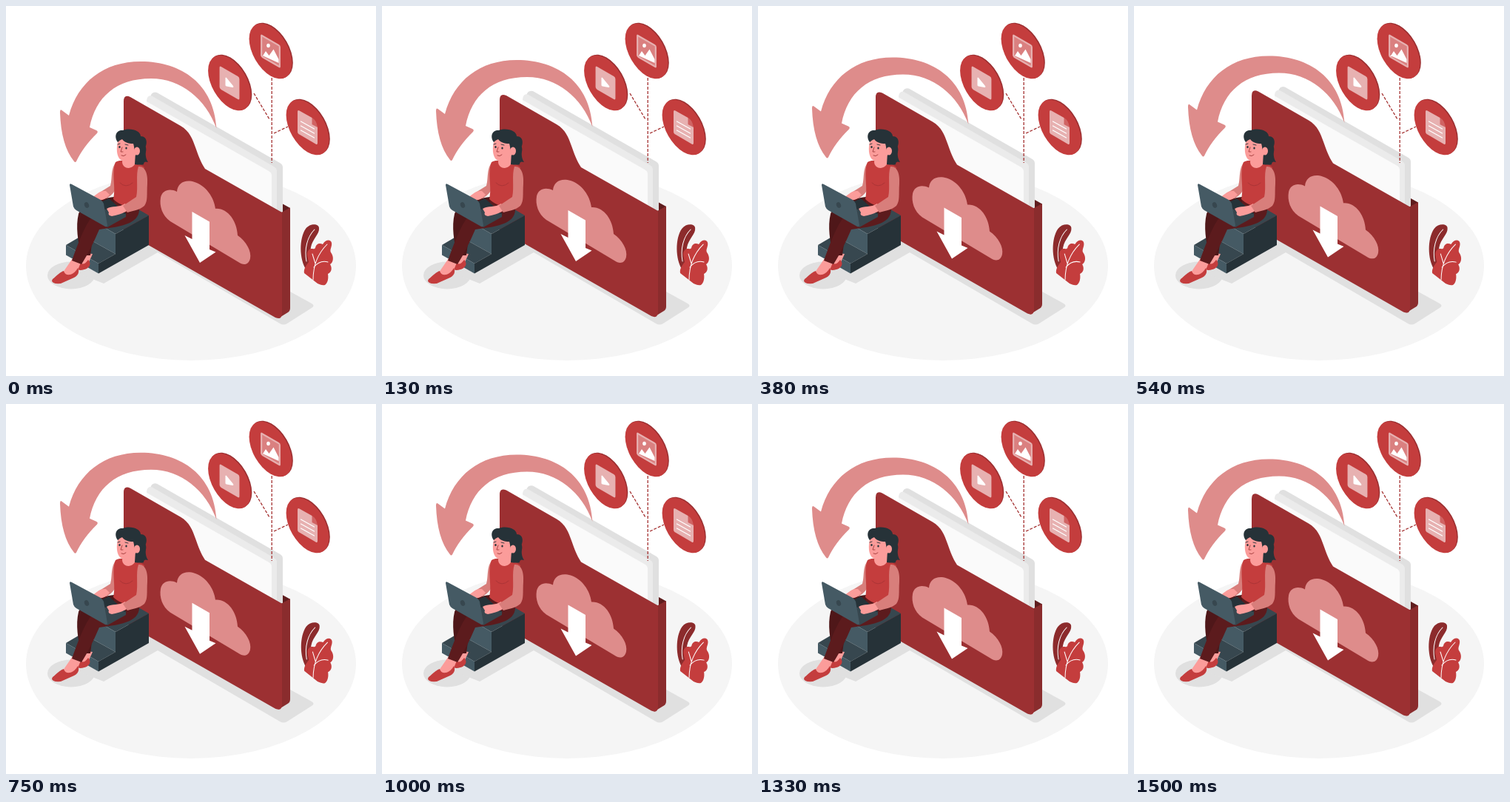
An HTML page for the animation above (1540 ms loop, 500 px wide and 500 px high).

```html
<!DOCTYPE html>
<html lang="en">
<head>
<meta charset="utf-8">
<title>Folder download</title>
<style>
  html, body { margin: 0; width: 100%; height: 100%; overflow: hidden; background: #fff; }
  svg { display: block; width: 100%; height: 100%; }
  .red { fill: #c43d3d; }
  .deep { fill: #9c3032; }
  .pink { fill: #de8c8b; }
  .pale { fill: #e7b1b1; }
  .skin { fill: #fb9c9a; }
  .sleeve { fill: #d87e7b; }
  .ink { fill: #263238; }
  .slate { fill: #37474f; }
  .steel { fill: #455a64; }
  .shade { fill: #e0e0e0; }
  .white { fill: #fff; }
  .line { fill: none; stroke-linecap: round; stroke-linejoin: round; }
</style>
</head>
<body>
<svg viewBox="0 0 500 500">
  <defs>
    <g id="badge" transform="matrix(.866 .5 0 1 0 0)">
      <circle cx="1.6" cy="-1.8" r="33.4" class="deep"/>
      <circle r="33.4" class="red"/>
    </g>
    <rect id="tile" x="-15.5" y="-15.5" width="31" height="31" rx="2.5" class="pale" transform="matrix(.866 .5 0 1 0 0)"/>
  </defs>

  <!-- Floor and shadows -->
  <ellipse cx="250" cy="351" rx="223" ry="128" fill="#f5f5f5"/>
  <ellipse cx="88" cy="364" rx="32" ry="18.5" class="shade"/>
  <path class="shade" d="M97 361L132 375L205 333L370 429Q375 432 380 429L413 408Q418 405 413 402L384 386L193 300Z"/>

  <g id="folder">
    <path fill="#5f1d1e" d="M355 256L384 272L373 280L350 270Z"/>
    <path class="shade" d="M195 122Q197 114 204 116L370 211Q374 213 374 217V279L195 180Z"/>
    <path fill="#ebebeb" d="M190 127Q191 118 198 121L362 216Q366 218 366 222V274L190 180Z"/>
    <path fill="#fafafa" d="M190 128L355 222Q359 224 359 228V270L190 180Z"/>
    <path fill="#8a2c2d" d="M372 278L384 271.5V407Q384 411 381 413L368 421Z"/>
    <path class="deep" d="M159 128Q159 118 168 122L236 161C248 168 252 179 256 190C260 201 263 210 269 219L373 278V414Q373 424 364 420L159 303Z"/>
    <path class="pink" d="M222 290C211 282 207 269 209 258C211 248 221 245 231 250C232 238 242 233 255 237C270 242 281 257 283 273C300 272 312 290 313 309C325 317 332 331 330 340C328 349 321 350 314 345Z"/>
    <path class="white" d="M251.500 277L275 290.500V328L283.500 331.500L262 346L241.500 309L251.500 314Z"/>
    <path class="pink" d="M284.500 164.500C281 105 238 74 182 74C132 74 97 102 85 147L75.500 140Q73 138 73 143C74 172 80 194 92 209Q93.500 211 95 209C101 196 110 184 123 171Q125 168.500 122 167L113 163C121 122 149 97 196 97C237 97 270 125 284.500 164.500Z"/>
  </g>

  <!-- Links and badges -->
  <path class="line" stroke="#a53333" stroke-width="1.300" stroke-dasharray="4 2" style="stroke-linecap:butt" d="M359.200 97V212M335 118L356 153M362 172L381 163"/>
  <g transform="translate(302 104)">
    <use href="#badge"/><use href="#tile"/>
    <path class="white" d="M-5.500 -7Q-5 -8 -4 -7L5 4Q6 6 4 6L-4 4.500Q-5.500 4 -5.500 3Z"/>
  </g>
  <g transform="translate(357.500 61)">
    <use href="#badge"/><use href="#tile"/>
    <rect x="-13" y="-13" width="26" height="26" fill="#da8080" transform="matrix(.866 .5 0 1 0 0)"/>
    <ellipse cx="-3" cy="-7.500" rx="2.300" ry="2.800" class="white"/>
    <path class="white" d="M-11 7L-6.500 0L-2 6L4 -2.500L11 11V16L-11 6Z"/>
  </g>
  <g transform="translate(407.500 164)">
    <use href="#badge"/>
    <path class="pale" d="M-13.500 -21Q-13.500 -24 -11 -22.500L6 -13L13.500 0V21Q13.500 24 11 22.500L-12 9Q-13.500 8 -13.500 6Z"/>
    <path fill="#d06363" d="M6 -13Q12 -10 13.500 0L6 -4Z"/>
    <path class="line" stroke="#fff" stroke-width="1.300" d="M-9 -8L9 2M-9 -2L9 8M-9 4L9 14"/>
  </g>

  <g id="plant">
    <path fill="#8c2b2c" d="M406 357C396 342 396 314 405 301C411 293 423 294 423 300C424 308 414 315 412 326C410 338 410 350 412 358Z"/>
    <path class="line" stroke="#fff" stroke-width="1" d="M417 302C407 312 403 328 406 345"/>
    <path class="red" d="M403 361C402 356 405 351 409 346C408 340 405 334 409 330C412 326 416 330 418 327C419 321 424 320 428 322C432 315 439 315 440 320C441 325 437 329 439 333C443 338 443 346 438 349C441 354 440 360 435 362C436 368 435 374 431 377C427 378 424 376 421 375Z"/>
    <path class="line" stroke="#fff" stroke-width="1" d="M415 370C415 352 421 335 434 322M418 348L414 335M416 353Q424 343 435 346"/>
  </g>

  <!-- Steps -->
  <path class="slate" d="M103 282L148 257L193 283L148 308Z"/>
  <path class="steel" d="M103 282L148 308V335L103 310Z"/>
  <path class="slate" d="M81 323L103 310L148 335L125 348Z"/>
  <path class="steel" d="M81 323L125 348V361.500L81 336.500Z"/>
  <path class="ink" d="M148 308L193 283V323L125 361.500V348L148 335Z"/>

  <!-- Woman -->
  <path class="skin" d="M101 333L117 335L109 353L99 352Z"/>
  <path class="red" d="M99 345Q104 353 111 343C117 349 111 355 106 356Q96 359 97 353Z"/>
  <path fill="#4f1719" d="M146 258C124 261 102 268 98 281C94 298 97 318 102 337L114 337L119 298L165 280Z"/>
  <path class="skin" d="M90 341L101 347L94 364L72 370L79 357Z"/>
  <path class="red" d="M63 369C69 364 74 359 78 358C80 366 91 365 97 354C100 359 97 365 92 367L74 375Q62 376 62 371Z"/>
  <path fill="#5c1b1d" d="M146 262C160 256 179 265 180 276C179 291 163 296 146 299L126 302C119 318 111 335 102 349L89 344C96 324 104 303 113 289Q124 277 146 275Z"/>
  <path class="sleeve" d="M149 211C141 219 144 234 141 243L125 253L130 262C142 259 148 250 150 243Z"/>
  <path class="red" d="M148 211C158 206 176 209 187 218C186 237 184 252 182 268C170 276 153 269 145 261C149 245 142 226 148 211Z"/>
  <path class="skin" d="M158 199H176L175 211C173 221 158 222 157 211Z"/>
  <path class="ink" d="M176 182C186 181 191 190 189 197C188 203 190 208 192 211Q186 209 186 214Q182 215 174 214Z"/>
  <path class="skin" d="M152 180C148 193 150 203 154 207C160 212 172 207 177 199L179 178L160 173Z"/>
  <path class="ink" d="M151 184C145 175 150 167 158 168C169 164 182 169 182 176C192 176 191 188 187 193L178 203C173 199 174 192 172 186C165 186 160 184 157 180Q154 181 151 184Z"/>
  <ellipse cx="177" cy="196" rx="4" ry="5.500" class="skin"/>
  <g class="ink">
    <ellipse cx="153.500" cy="190.500" rx="1.200" ry="1.500"/>
    <ellipse cx="162.500" cy="192" rx="1.200" ry="1.500"/>
  </g>
  <path class="line" stroke="#263238" stroke-width=".9" d="M151 187L154 186M161 187L165 188"/>
  <path class="line" stroke="#a33b3b" stroke-width=".9" d="M157 191L155 197L158 197M156 202Q159 204 162 201"/>
  <path class="line" stroke="#a93436" stroke-width=".9" d="M154 239Q162 247 171 239"/>

  <!-- Laptop and arms -->
  <path class="skin" d="M114 260C122 256 125 249 135 250L140 255C133 263 124 264 119 263Z"/>
  <path class="ink" d="M124 267L139 260L163 281L136 297Z"/>
  <path class="slate" d="M126 273L162 281V285L137 299L100 278Z"/>
  <path class="steel" d="M86 242Q86 239 89 241L128 262Q131 264 132 267L137 296Q137 299 134 298L95 276Q92 274 91 271Z"/>
  <ellipse cx="109" cy="269" rx="3" ry="4" class="slate" transform="rotate(-20 109 269)"/>
  <path class="skin" d="M136 274C144 269 152 273 161 267L165 276C157 281 149 283 143 284Q137 283 139 279Z"/>
  <path class="sleeve" d="M179 217C189 216 192 229 191 240C190 255 192 263 187 270C180 276 171 277 164 279L158 270L176 258C179 246 175 228 179 217Z"/>
</svg>
<script>
  const LOOP = 1540, PEAK = 705, LIFT = 9.8, REST = 0.9;
  const folder = document.getElementById('folder');
  const plant = document.getElementById('plant');

  function draw(now) {
    const t = now % LOOP;
    const rise = t < PEAK ? t / PEAK : (LOOP - t) / (LOOP - PEAK);
    folder.setAttribute('transform', `translate(0 ${REST - LIFT * rise})`);
    plant.setAttribute('transform', `rotate(${0.6 * rise} 418 374)`);
    requestAnimationFrame(draw);
  }
  requestAnimationFrame(draw);
</script>
</body>
</html>
```
